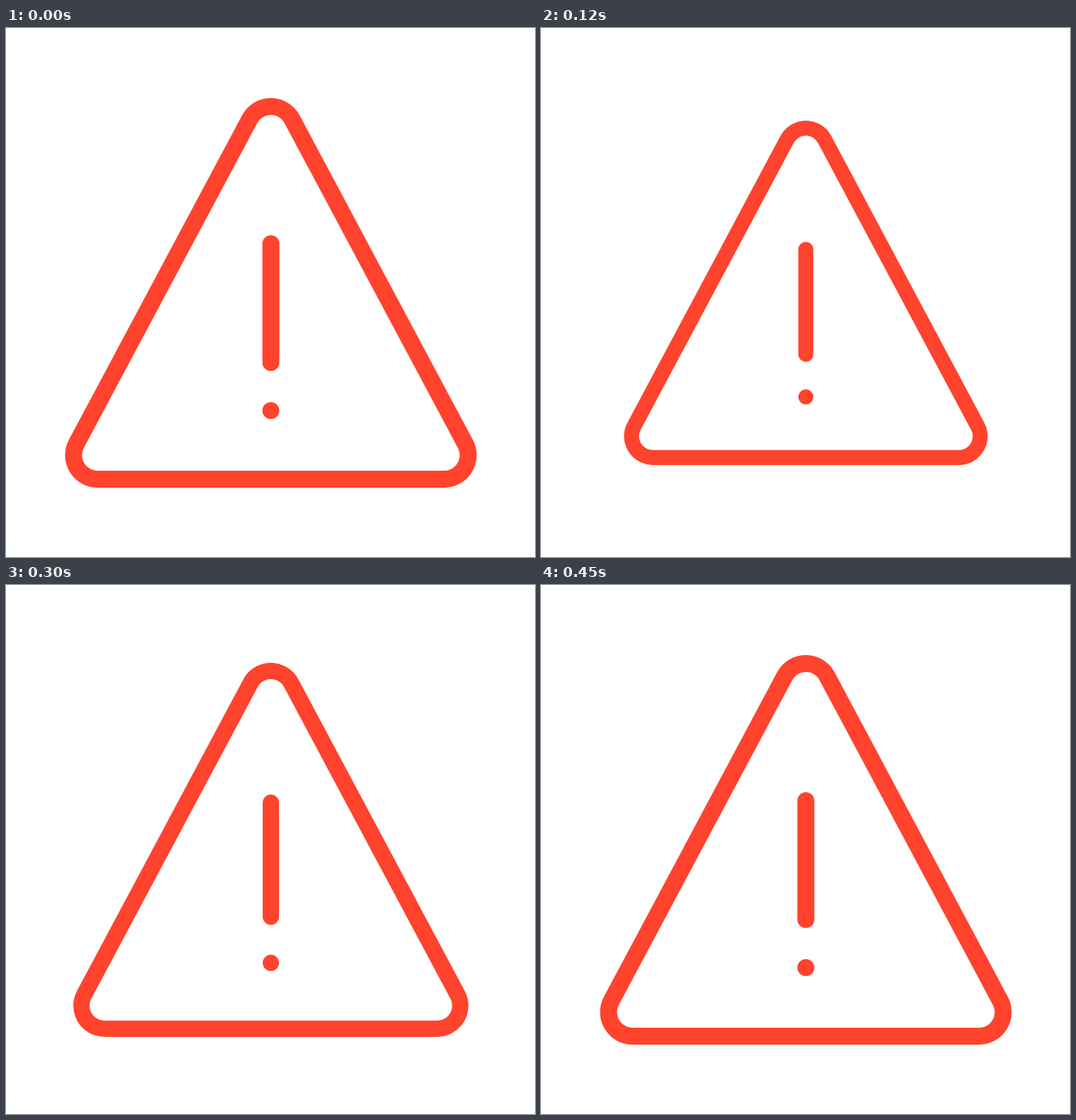
Write an HTML page that moves like this. It is 748 px wide and 748 px high and loops after 1.11 s.

```html
<!DOCTYPE html>
<html lang="en">
<head>
<meta charset="utf-8">
<title>Warning pulse</title>
<style>
  html, body { margin: 0; height: 100%; overflow: hidden; background: #fff; }
  svg { display: block; width: 100vw; height: 100vh; }
</style>
</head>
<body>
<svg viewBox="0 0 748 748">
  <defs>
    <path id="tri" d="M374.5 145L619.5 604H129.5Z" stroke-linejoin="round"/>
  </defs>
  <g id="sign" stroke="#ff432d" stroke-linecap="round">
    <use href="#tri" stroke-width="92"/>
    <use href="#tri" stroke="#fff" fill="#fff" stroke-width="44"/>
    <path d="M374.5 305V473M374.5 541h0" stroke-width="24"/>
  </g>
</svg>
<script>
  const LOOP = 1110, STEP = 30, MID = 374.5;
  const sign = document.getElementById('sign');
  const start = performance.now();

  // Each phase: start, end, scale from, scale to, easing
  const phases = [
    [0, 150, 1, 0.882, p => 1 - (1 - p) ** 2.65],
    [150, 300, 0.882, 0.96, p => p ** 2.7],
    [300, 450, 0.96, 1, p => p],
  ];

  function scaleAt(t) {
    const phase = phases.find(([, end]) => t < end);
    if (!phase) return 1;
    const [begin, end, from, to, ease] = phase;
    return from + (to - from) * ease((t - begin) / (end - begin));
  }

  function draw(now) {
    const t = Math.max(0, now - start) % LOOP;
    const s = scaleAt(Math.floor(t / STEP) * STEP);
    sign.setAttribute('transform',
      `translate(${MID} ${MID}) scale(${s}) translate(${-MID} ${-MID})`);
    requestAnimationFrame(draw);
  }
  draw(start);
</script>
</body>
</html>
```
